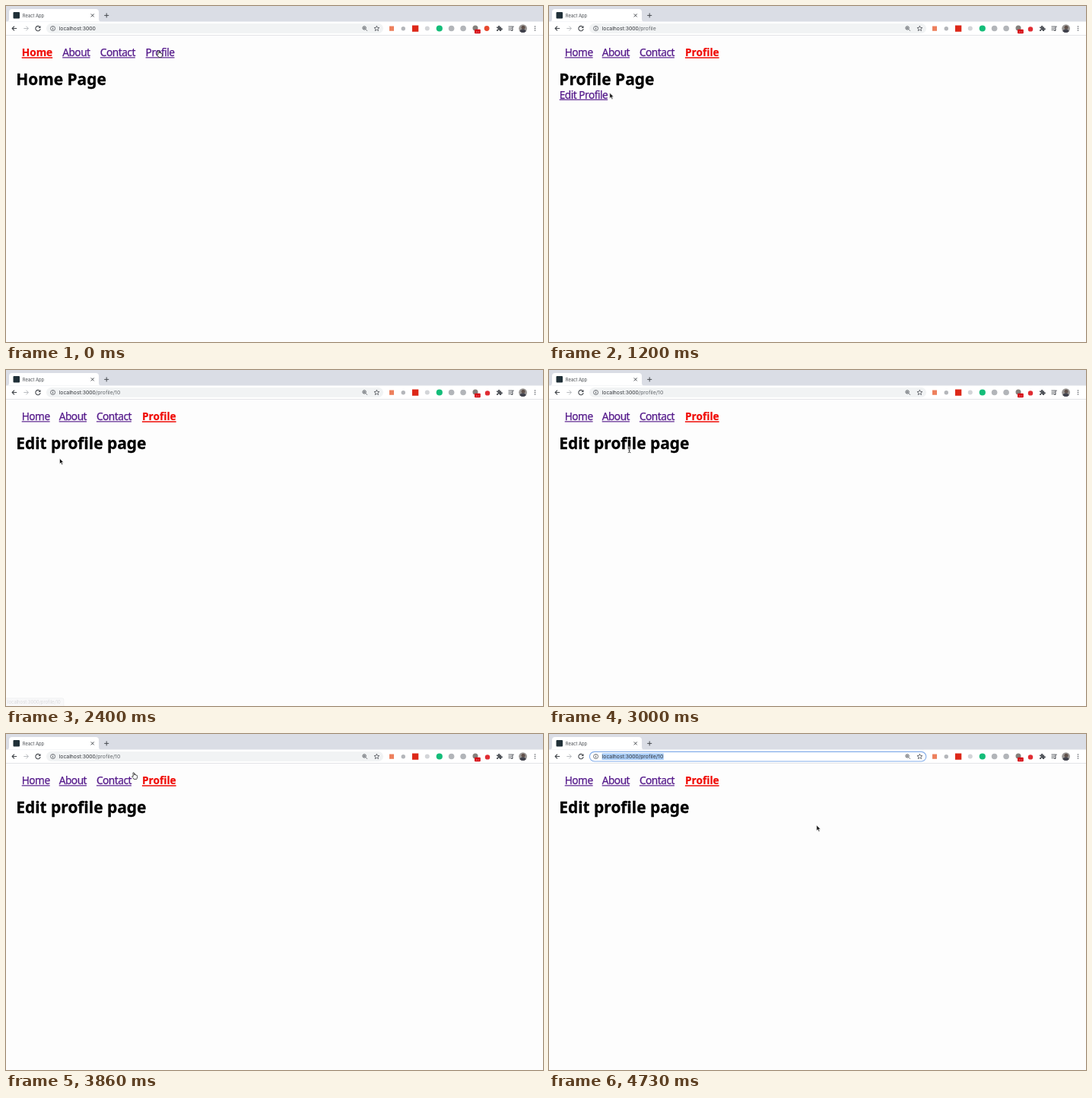
An HTML page with a canvas for the animation above (4800 ms loop, 706 px wide and 442 px high).

```html
<!DOCTYPE html>
<html lang="en">
<head>
<meta charset="utf-8">
<title>Router demo</title>
<style>
html, body { margin: 0; width: 100%; height: 100%; overflow: hidden; background: #fdfdfd; }
canvas { display: block; width: 706px; height: 442px; }
</style>
</head>
<body>
<canvas id="stage"></canvas>
<script>
const W = 706, H = 442, LOOP = 4800;
const PAGE_FONT = '"Noto Sans", sans-serif';
const UI_FONT = 'Inter, sans-serif';
const INK = '#50545a';

const canvas = document.getElementById('stage');
const ctx = canvas.getContext('2d');
const ratio = window.devicePixelRatio || 1;
canvas.width = W * ratio;
canvas.height = H * ratio;

// Pointer hotspot: time, x, y, shape until the next key
const pointerKeys = [
  [0, 200.5, 59, 'hand'],
  [800, 200.5, 59, 'hand'],
  [870, 184, 72, 'arrow'],
  [1130, 88, 111, 'arrow'],
  [1260, 73, 117, 'hand'],
  [1660, 70.5, 116.3, 'hand'],
  [2290, 70.5, 116.3, 'arrow'],
  [2780, 70.5, 116.3, 'arrow'],
  [2900, 92, 108, 'beam'],
  [3000, 105.5, 105, 'beam'],
  [3260, 142, 108, 'arrow'],
  [3460, 154, 116, 'arrow'],
  [3590, 154, 116, 'arrow'],
  [3780, 163, 62, 'hand'],
  [3860, 167.5, 51, 'hand'],
  [3930, 181, 45, 'arrow'],
  [4130, 228, 33, 'beam'],
  [4330, 256, 29.5, 'beam'],
  [4400, 272, 44, 'arrow'],
  [4600, 335, 98, 'arrow'],
  [4710, 351.8, 120, 'arrow'],
  [4800, 351.8, 120, 'arrow']
];

const clamp = v => Math.max(0, Math.min(1, v));
const ramp = (t, start, end) => clamp((t - start) / (end - start));

function shape(d, fill, stroke, width = 1) {
  const path = new Path2D(d);
  if (fill) { ctx.fillStyle = fill; ctx.fill(path); }
  if (stroke) { ctx.strokeStyle = stroke; ctx.lineWidth = width; ctx.stroke(path); }
}

function rect(x, y, w, h, color) {
  ctx.fillStyle = color;
  ctx.fillRect(x, y, w, h);
}

function rounded(x, y, w, h, radius, fill, stroke, width = 1) {
  ctx.beginPath();
  ctx.roundRect(x, y, w, h, radius);
  if (fill) { ctx.fillStyle = fill; ctx.fill(); }
  if (stroke) { ctx.strokeStyle = stroke; ctx.lineWidth = width; ctx.stroke(); }
}

function disc(x, y, r, fill, stroke, width = 1) {
  rounded(x - r, y - r, 2 * r, 2 * r, r, fill, stroke, width);
}

function label(str, x, y, font, color, { spacing = 0, weight = 0 } = {}) {
  ctx.font = font;
  ctx.letterSpacing = spacing + 'px';
  ctx.fillStyle = color;
  ctx.fillText(str, x, y);
  if (weight) {
    ctx.strokeStyle = color;
    ctx.lineWidth = weight;
    ctx.lineJoin = 'round';
    ctx.strokeText(str, x, y);
  }
  const width = ctx.measureText(str).width;
  ctx.letterSpacing = '0px';
  return width;
}

function link(str, x, y, active) {
  const color = active ? '#f00b06' : '#551a8b';
  const font = (active ? 'bold ' : '') + '13.7px ' + PAGE_FONT;
  const style = active ? { weight: 0.2 } : { spacing: -0.5, weight: 0.25 };
  const width = label(str, x, y, font, color, style);
  rect(x, y + 0.9, width, active ? 1.5 : 1.15, color);
}

function drawTabs() {
  rect(0, 0, W, 20.5, '#dadde5');
  shape('M1 20.5Q4 20.5 4 17V8Q4 4 8 4H118Q122 4 122 8V17Q122 20.5 125 20.5Z', '#fff');
  rounded(9.5, 8, 8.5, 8.5, 1, '#203038');
  label('React App', 21.8, 14.6, '5.8px ' + UI_FONT, '#484c51');
  shape('M111.7 10.4L115.7 14.4M115.7 10.4L111.7 14.4', null, '#484c51', 1);
  shape('M129.2 12.4H135.2M132.2 9.4V15.4', null, '#484c51', 1);
}

function drawNavigation() {
  shape('M14.2 29.5H8.2M11 26.6L8.1 29.5L11 32.4', null, '#43474c', 1.1);
  shape('M23.3 29.5H29.3M26.5 26.6L29.4 29.5L26.5 32.4', null, '#b9bcc0', 1);
  shape('M44.6 27.6A3.2 3.2 0 1 0 45.2 30.2', null, '#43474c', 1.1);
  shape('M45.5 25.9V29H42.4Z', '#43474c');
}

function drawAddress(url, selected) {
  if (selected) rounded(53.4, 23.4, 442.4, 12.6, 6.3, '#fff', '#83ade9', 1.1);
  else rounded(53, 23, 443, 13, 6.5, '#f1f3f4');

  disc(61.6, 29.5, 3, null, INK, 0.8);
  rect(61.2, 29, 0.9, 2.2, INK);
  rect(61.2, 27.4, 0.9, 0.9, INK);

  const font = '6.8px ' + UI_FONT;
  ctx.font = font;
  if (selected) rect(69.5, 25.3, ctx.measureText(url).width + 0.8, 8.7, '#a9cdf8');
  const host = 'localhost:3000';
  const width = label(host, 69.7, 31.9, font, '#303338');
  label(url.slice(host.length), 69.7 + width, 31.9, font, selected ? '#303338' : '#62666b');

  disc(471.1, 28.9, 2.2, null, INK, 0.9);
  shape('M472.8 30.6L475 32.8M470 28.9H472.2M471.1 27.8V30', null, INK, 0.8);

  let star = '';
  for (let i = 0; i < 10; i++) {
    const angle = -Math.PI / 2 + i * Math.PI / 5;
    const r = i % 2 ? 1.6 : 3.6;
    star += (i ? 'L' : 'M') + (487.4 + r * Math.cos(angle)) + ' ' + (29.7 + r * Math.sin(angle));
  }
  shape(star + 'Z', null, INK, 0.8);
}

function drawExtensions(home) {
  rect(504, 26.5, 6, 6.3, '#ed805d');
  disc(522.3, 29.8, 2.7, '#b4b6ba');
  rect(534, 25.5, 8.3, 8.3, '#dd2819');
  disc(553.8, 29.5, 3, '#d3d5d8');
  disc(569.8, 29.5, 4.1, '#14bd79');
  disc(585.6, 29.5, 3.8, '#b2b5b9');
  disc(601.1, 29.5, 3.8, '#b2b5b9');
  disc(617, 29, 3.5, '#85817d');
  rounded(616, 30.7, 7.8, 5.6, 1, '#d60b14');
  for (let i = 0; i < 3; i++) rect(618 + i * 1.5, 33.7, 0.7, 0.7, '#fff');
  if (home) disc(632.1, 29.5, 3.4, '#e7492f');
  else disc(633, 30.4, 3.2, '#e02c32');

  shape('M645 27.4H647A1.2 1.2 0 1 1 649.3 27.4H651.1V29.3A1.2 1.2 0 1 1 651.1 31.4V33H648.9A1.1 1.1 0 1 0 646.9 33H645V31A1.1 1.1 0 1 0 645 29.1Z', INK);
  shape('M660.5 27H666M660.5 29.2H666M660.5 31.4H664M666 32V27.1H667.8', null, INK, 0.9);
  disc(665.2, 32, 1.1, INK);
  drawAvatar();
  for (let i = -1; i <= 1; i++) disc(695.5, 29.5 + i * 2.5, 0.75, INK);
}

function drawAvatar() {
  ctx.save();
  ctx.beginPath();
  ctx.arc(679.6, 29.6, 5.4, 0, Math.PI * 2);
  ctx.clip();
  rect(674, 24, 12, 12, '#9a9795');
  disc(680, 28.3, 2.5, '#60514b');
  disc(679.5, 35, 4.6, '#3f414c');
  ctx.restore();
}

function drawPage(page) {
  const home = page === 'home';
  const starts = home ? [20.7, 74.2, 123.8, 183.6] : [20.7, 69.7, 118.9, 178.9];
  ['Home', 'About', 'Contact', 'Profile'].forEach((name, i) =>
    link(name, starts[i], 66.4, i === (home ? 0 : 3)));

  const heading = { home: 'Home Page', profile: 'Profile Page', edit: 'Edit profile page' }[page];
  label(heading, 13.3, 103.7, 'bold 20.9px ' + PAGE_FONT, '#000', { weight: 0.3 });
  if (page === 'profile') link('Edit Profile', 13.7, 121.8, false);
}

function drawStatus(str, width, alpha) {
  if (alpha <= 0) return;
  ctx.save();
  ctx.globalAlpha = alpha;
  rounded(-2, 431.8, width + 2, 12, 2, '#dadde2', '#bfc2c6', 0.8);
  label(str, 2, 439, '5.9px ' + UI_FONT, '#484c51');
  ctx.restore();
}

function drawPointer(t) {
  const i = pointerKeys.findIndex((key, n) => n > 0 && t < key[0]) - 1;
  const [start, x0, y0, kind] = pointerKeys[i];
  const [end, x1, y1] = pointerKeys[i + 1];
  const k = ramp(t, start, end);
  ctx.save();
  ctx.translate(x0 + (x1 - x0) * k, y0 + (y1 - y0) * k);
  if (kind === 'arrow') {
    shape('M0 0V7.2L1.7 5.7L2.9 8.4L4.2 7.8L3 5.2H5.2Z', '#111', '#fff', 0.6);
  } else if (kind === 'hand') {
    shape('M-.8 .2Q0-.6 .7 .2L1.2 3Q2-.1 2.5 3.1Q3.4 2.3 3.7 3.5Q4.8 2.9 4.9 4.3V6Q4.7 7.2 4 8.5H.4Q-.4 6.9-2 5.3Q-2.2 4-.4 4.7Z', '#fff', '#222', 0.8);
  } else {
    const beam = 'M-1.8-3.7Q0-3.7 0-2.4Q0-3.7 1.8-3.7M0-2.4V2.4M-1.8 3.7Q0 3.7 0 2.4Q0 3.7 1.8 3.7M-1 1H1';
    shape(beam, null, '#fff', 1.8);
    shape(beam, null, '#222', 0.8);
  }
  ctx.restore();
}

function draw(t) {
  const page = t < 330 ? 'home' : t < 2290 ? 'profile' : 'edit';
  const route = { home: '', profile: '/profile', edit: '/profile/10' }[page];
  ctx.setTransform(ratio, 0, 0, ratio, 0, 0);
  rect(0, 0, W, H, '#fdfdfd');
  rect(0, 20, W, 18.5, '#fff');
  rect(0, 38, W, 0.8, '#dcdee1');
  drawTabs();
  drawNavigation();
  drawAddress('localhost:3000' + route, t >= 4330);
  drawExtensions(page === 'home');
  drawPage(page);
  drawStatus('localhost:3000/profile', 67.5, ramp(t, 60, 200) - ramp(t, 930, 1060));
  drawStatus('localhost:3000/profile/10', 76, ramp(t, 1300, 1430) - ramp(t, 2290, 2425));
  drawPointer(t);
}

function tick() {
  draw(performance.now() % LOOP);
  requestAnimationFrame(tick);
}
tick();
</script>
</body>
</html>
```
